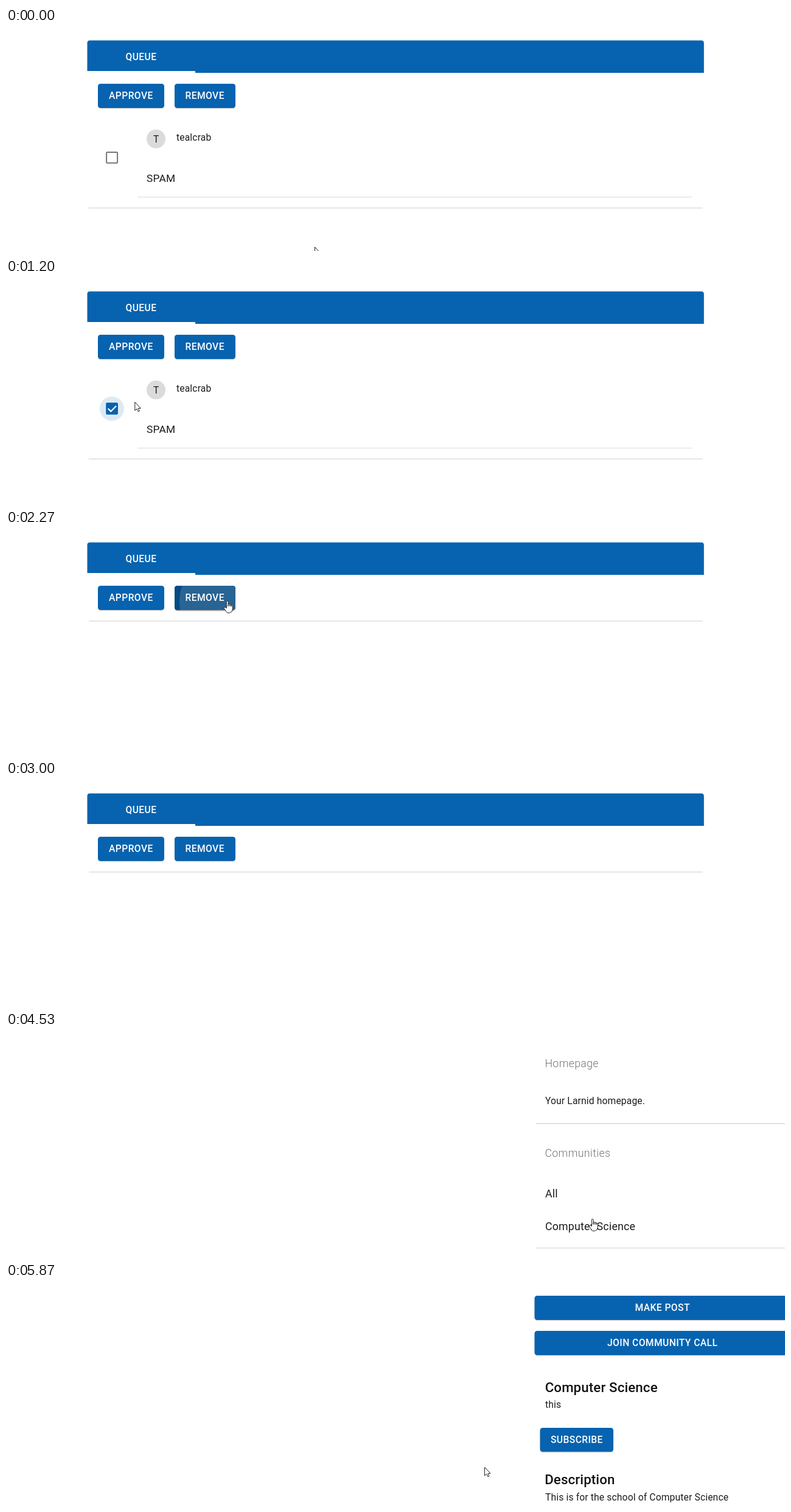
An HTML page for the animation above (5.94 s loop, 1280 by 368 pixels).

```html
<!DOCTYPE html>
<html lang="en">
<head>
<meta charset="utf-8">
<title>Moderation queue</title>
<style>
  html, body { margin: 0; width: 100%; height: 100%; overflow: hidden; background: #fff; }
  svg { display: block; width: 1280px; height: 368px; }
  text { font-family: Roboto, Arial, sans-serif; font-size: 15.6px; letter-spacing: .167px; fill: #1c1c1c; }
  .caps { font-weight: 500; letter-spacing: .445px; fill: #fff; }
  .big { font-size: 17.7px; letter-spacing: .25px; }
  .spam { font-size: 17.3px; }
  .sub { font-size: 17.7px; letter-spacing: .35px; font-weight: 300; fill: #747474; }
  .title { font-size: 22.2px; letter-spacing: .167px; font-weight: 500; fill: #111; }
  .mid { text-anchor: middle; }
  .blue { fill: #0763af; }
  .shade { fill: #000; opacity: .22; }
  .line { fill: #dedede; }
  #cursor path { fill: #fff; stroke: #222; stroke-width: 1; stroke-linejoin: round; }
</style>
</head>
<body>
<svg viewBox="0 0 1280 368">
  <defs>
    <clipPath id="removeClip"><rect x="277" y="92" width="100" height="40" rx="4.4"/></clipPath>
  </defs>

  <g id="queue">
    <path class="blue" d="M133.5 74V25q0-4.4 4.4-4.4H1142.4q4.4 0 4.4 4.4V74Z"/>
    <rect x="133" y="71" width="178" height="3.2" fill="#fff"/>
    <text class="caps" x="196.5" y="52.6">QUEUE</text>
    <g data-button="151 92 109 40"></g>
    <text class="caps" x="169" y="117">APPROVE</text>
    <g data-button="277 92 100 40"></g>
    <g id="hover">
      <rect x="277" y="93" width="100" height="41" rx="5" fill="#000" opacity=".2"/>
      <rect x="277" y="92" width="100" height="40" rx="4.4" fill="#054a82"/>
    </g>
    <g clip-path="url(#removeClip)">
      <circle id="ripple" cx="363" cy="118" r="0" fill="#fff"/>
    </g>
    <text class="caps" x="294.5" y="117">REMOVE</text>

    <g id="row">
      <circle cx="246.5" cy="183" r="15.5" fill="#dbdbdb"/>
      <text class="mid" x="246.8" y="188.7">T</text>
      <text x="280" y="186">tealcrab</text>
      <text class="big spam" x="231" y="253.7">SPAM</text>
      <rect class="line" x="216" y="278.5" width="911" height="1.1"/>
      <rect class="line" x="135.5" y="296.2" width="1009" height="1.6" rx=".8"/>
      <rect id="empty" x="165.1" y="205" width="18" height="17.8" rx="1.5" fill="#fff" stroke="#757575" stroke-width="2"/>
      <circle id="press" cx="174" cy="214" r="0" fill="#0763af"/>
      <g id="checked">
        <rect class="blue" x="164.2" y="203.9" width="19.8" height="19.8" rx="2.2"/>
        <path d="M167.6 213.8l4.7 4.6 8.8-9" fill="none" stroke="#fff" stroke-width="2.2"/>
      </g>
    </g>
    <rect id="end" class="line" x="136" y="149.4" width="1009" height="1.6" rx=".8"/>
  </g>

  <g id="home">
    <text class="sub" x="885.5" y="58">Homepage</text>
    <text x="886" y="118.6">Your Larnid homepage.</text>
    <rect class="line" x="870.5" y="150.3" width="420" height="1.6" rx=".8"/>
    <g id="loading">
      <rect class="line" x="-9" y="109.3" width="848" height="1.6" rx=".8"/>
      <rect class="line" x="870.5" y="257.3" width="420" height="1.6" rx=".8"/>
      <path d="M416 65.6l4 1.2M1096 213.2l4 1.2" stroke="#3f7fb5" stroke-width="2"/>
    </g>
    <g id="list">
      <text class="sub" x="885.5" y="206">Communities</text>
      <text class="big" x="886" y="273.3">All</text>
      <text class="big" x="886" y="326.5">Computer Science</text>
      <rect class="line" x="870.5" y="355.7" width="420" height="1.6" rx=".8"/>
    </g>
  </g>

  <g id="community">
    <g data-button="868.5 21 420 40"></g>
    <text class="caps mid" x="1078.7" y="46">MAKE POST</text>
    <g data-button="868.5 79 420 40"></g>
    <text class="caps mid" x="1078.7" y="103.6">JOIN COMMUNITY CALL</text>
    <text class="title" x="885.7" y="180">Computer Science</text>
    <text x="886" y="206.4">this</text>
    <g data-button="877.5 239 120.5 39.5"></g>
    <text class="caps" x="895" y="264">SUBSCRIBE</text>
    <text class="title" x="885.2" y="332">Description</text>
    <text x="886" y="358.5">This is for the school of Computer Science</text>
  </g>

  <g id="cursor">
    <path id="arrow" d="M.5 .5V14.5L3.7 11.6 5.9 16.3 8 15.3 5.9 10.8H10Z"/>
    <path id="hand" d="M-1.2 12.5V2a1.4 1.4 0 0 1 2.8 0V9.5 6.8a1.25 1.25 0 0 1 2.5 0V9.5 7.4a1.2 1.2 0 0 1 2.4 0V9.7 8.4a1.15 1.15 0 0 1 2.3 0V14.5L7.3 18.5Q4.5 21 .2 20.3L-1.5 18.3-5 13.2q-.8-1.7 .6-2.2Q-2.8 10.6-1.2 12.5Z"/>
  </g>
</svg>
<script>
const LOOP = 5940;
const $ = id => document.getElementById(id);

document.querySelectorAll('[data-button]').forEach(g => {
  const [x, y, w, h] = g.dataset.button.split(' ').map(Number);
  const box = (cls, dy) =>
    `<rect class="${cls}" x="${x}" y="${y + dy}" width="${w}" height="${h}" rx="4.4"/>`;
  g.innerHTML = box('shade', 1) + box('blue', 0);
});

const linear = u => u;
const easeIn = u => u * u;
const easeOut = u => u * (2 - u);
const easeInOut = u => u * u * (3 - 2 * u);

// [from, to] spans in which each part is visible
const spans = {
  queue: [[0, 3465]],
  row: [[0, 2195]],
  end: [[2195, 3465]],
  empty: [[0, 995]],
  checked: [[995, 2195]],
  home: [[3465, 4795]],
  loading: [[3465, 3530]],
  list: [[3530, 4795]],
  community: [[4795, LOOP]],
  hand: [[0, 0], [500, 1170], [1310, 2420], [4200, 4795]],
  arrow: [[0, 500], [1170, 1310], [2420, 2665], [3795, 4200], [4795, LOOP]]
};

// steps: [time, values, easing towards the next step]
const path = [
  [70, [507, 361], easeInOut], [600, [193.5, 215]],
  [665, [193.5, 215]], [730, [192, 213.5]],
  [1130, [192, 213.5], easeInOut], [1470, [363.5, 116.5]],
  [2370, [363.5, 116.5], easeIn], [2600, [37.5, 88]], [2665, [37.5, 88]],
  [3795, [58, 46], easeInOut], [4330, [963.5, 308]],
  [5390, [963.5, 308], easeIn], [5530, [884, 314], easeOut],
  [5730, [782.5, 306]], [5800, [782.5, 306]], [5865, [786, 303.5]]
];
const hover = [[1310, [0], easeInOut], [1560, [1]], [2440, [1], easeInOut], [2700, [0]]];
// radius and opacity
const press = [[930, [0, .18], easeOut], [1130, [20, .18]], [1400, [20, 0]]];
const ripple = [[2035, [0, .14], easeOut], [2270, [78, .14]], [2350, [90, .14]], [2700, [90, 0]]];

function sample(steps, t) {
  const next = steps.findIndex(step => step[0] > t);
  if (next === 0) return steps[0][1];
  if (next < 0) return steps.at(-1)[1];
  const [t0, a, ease = linear] = steps[next - 1];
  const [t1, b] = steps[next];
  const u = ease((t - t0) / (t1 - t0));
  return a.map((v, i) => v + (b[i] - v) * u);
}

function circle(id, steps, t) {
  const [r, opacity] = sample(steps, t);
  $(id).setAttribute('r', r);
  $(id).setAttribute('opacity', opacity);
}

function render(t) {
  for (const id in spans) {
    const on = spans[id].some(([from, to]) => t >= from && t < to);
    $(id).setAttribute('display', on ? 'inline' : 'none');
  }
  $('cursor').setAttribute('transform', `translate(${sample(path, t)})`);
  $('hover').setAttribute('opacity', sample(hover, t)[0]);
  circle('press', press, t);
  circle('ripple', ripple, t);
}

function frame(now) {
  render(now % LOOP);
  requestAnimationFrame(frame);
}
render(0);
requestAnimationFrame(frame);
</script>
</body>
</html>
```
